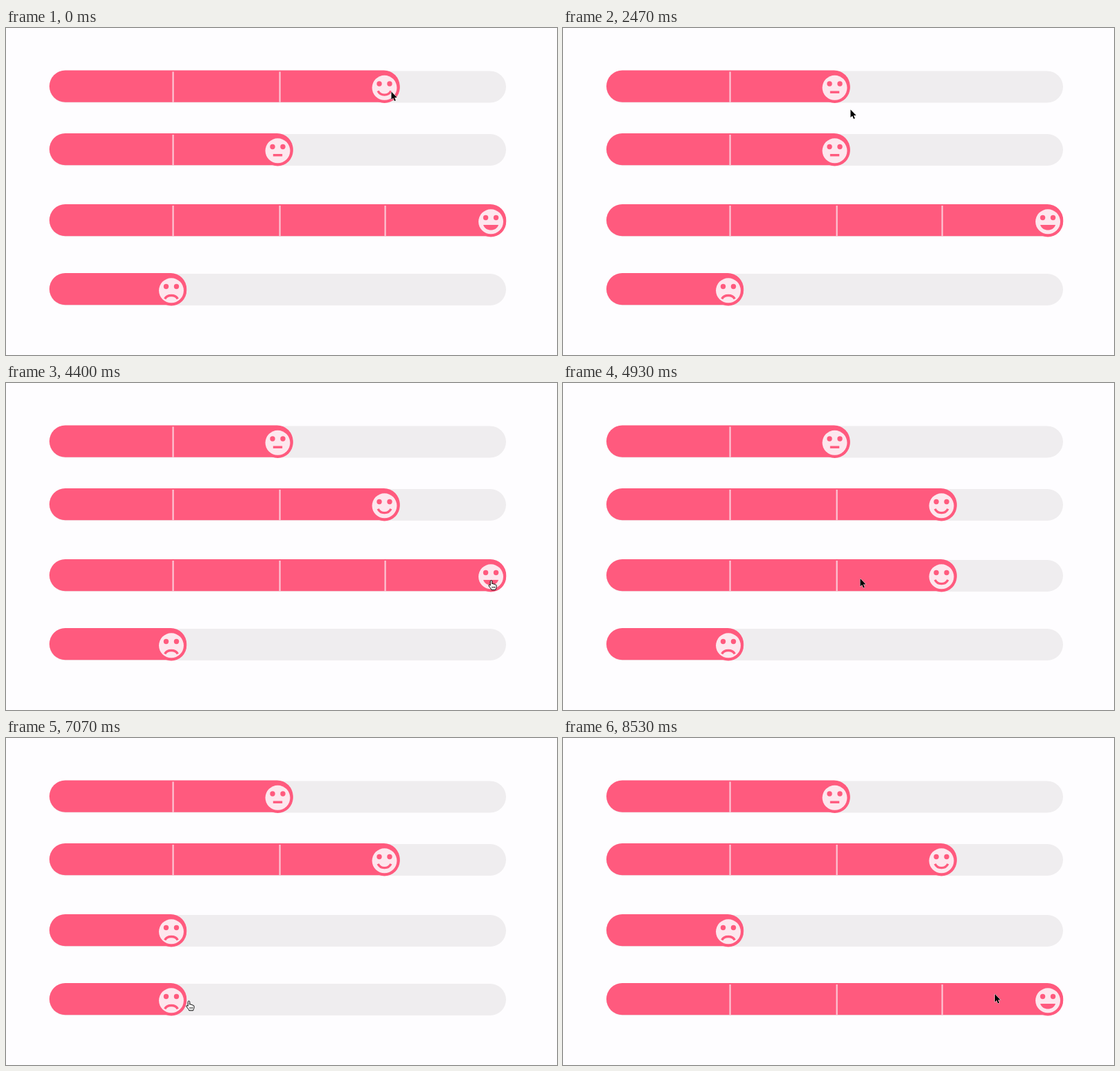
Recreate the animation shown at these times as an HTML page. Size 800 px wide and 475 px high, loop 9270 ms.

```html
<!DOCTYPE html>
<html lang="en">
<head>
<meta charset="utf-8">
<title>Smiley rating sliders</title>
<style>
  html, body { margin: 0; width: 100%; height: 100%; overflow: hidden; background: #fefdff; }
  svg { display: block; width: 100%; height: 100%; }
  .track { fill: #efedef; }
  .fill, .ring, .feature { fill: #ff5a7e; }
  .divider { fill: #fcc6d4; }
  .skin { fill: #fde7ee; }
  .line { fill: none; stroke: #ff5a7e; stroke-width: 3.4; }
  .arrow { fill: #000; stroke: #fff; stroke-width: .9; paint-order: stroke; stroke-linejoin: round; }
  .hand { fill: #fff; stroke: #000; stroke-width: 1; stroke-linejoin: round; }
  .crease { fill: none; stroke: #000; stroke-width: .8; }
</style>
</head>
<body>
<svg viewBox="0 0 800 475">
  <defs>
    <g id="head">
      <circle class="ring" r="22.2"/>
      <circle class="skin" r="18"/>
      <circle class="feature" cx="-7.5" cy="-5.8" r="3.7"/>
      <circle class="feature" cx="7.5" cy="-5.8" r="3.7"/>
    </g>
    <g id="face1"><use href="#head"/><path class="line" d="M-9.3 12.2C-6 5.5 6 5.5 9.3 12.2"/></g>
    <g id="face2"><use href="#head"/><path class="line" d="M-6.7 6.4H6.7"/></g>
    <g id="face3"><use href="#head"/><path class="line" d="M-9.4 4.6C-6 12.2 6 12.2 9.4 4.6"/></g>
    <g id="face4"><use href="#head"/><path class="feature" d="M-11 4.7H11C8.3 14.7-8.3 14.7-11 4.7Z"/></g>
  </defs>
  <g id="rows"></g>
  <path id="arrow" class="arrow" d="M.5 .5V12L3.1 9.6L5 14L6.9 13.2L5 8.9H8.7Z"/>
  <g id="hand">
    <path class="hand" d="M3.2 8.2V2.1C3.2 .2 5.8 .2 5.8 2.1V6C6.3 4.9 8 5.2 8 6.5C8.6 5.6 10.1 6 10.1 7.2C11 6.6 12 7.1 12 8.3V10.5C12 12 11 12.6 10.8 14.5H4.8C4.4 12.5 2.6 11.3 1 8.7C.2 7.2 1.9 6.6 3.2 8.2Z"/>
    <path class="crease" d="M5.9 9.6V12M7.8 9.6V12M9.6 9.6V12"/>
  </g>
</svg>
<script>
const LOOP = 9270;
const TICKS_PER_MS = 0.015;
const FACE_X = [240, 394.5, 549.5, 704];
const DIVIDER_X = [242.5, 397.5, 550.5];

// Each rating step is [tick, rating].
const rows = [
  { top: 61.5, steps: [[0, 3], [29, 2]] },
  { top: 153, steps: [[0, 2], [46, 3]] },
  { top: 256, steps: [[0, 4], [69, 3], [76, 2], [81, 1]] },
  { top: 356, steps: [[0, 1], [108, 2], [110, 3], [120, 4]] }
];

// Pointer stops: tick, x, y.
const stops = [
  [0, 559, 92], [5, 559, 92], [8, 545, 93], [20, 545, 93], [23, 544, 93],
  [24, 544, 93], [29, 466, 94], [34, 378, 92], [36, 378, 92], [37, 417, 118],
  [38, 429, 143], [39, 405, 166], [41, 405, 166], [46, 480, 169], [50, 537, 170],
  [55, 537, 170], [57, 549, 187], [61, 636, 246], [66, 700, 286], [67, 692, 286],
  [69, 622, 285], [74, 431, 283.5], [80, 322, 283], [84, 274.5, 282],
  [92, 274.5, 282], [95, 256, 325], [99, 229, 380], [105, 229, 380],
  [108, 325, 384], [111, 457, 387], [114, 457, 387], [118, 560, 378], [121, 626.5, 371.5]
];
const handSpans = [[8, 25], [34, 36], [39, 42], [50, 56], [65, 67], [98, 106]];

const byId = id => document.getElementById(id);

function add(parent, tag, attrs) {
  const node = document.createElementNS('http://www.w3.org/2000/svg', tag);
  for (const key in attrs) node.setAttribute(key, attrs[key]);
  return parent.appendChild(node);
}

for (const row of rows) {
  const group = add(byId('rows'), 'g', { transform: `translate(0 ${row.top})` });
  add(group, 'rect', { class: 'track', x: 63, y: 1, width: 663, height: 46, rx: 23 });
  row.fill = add(group, 'rect', { class: 'fill', x: 63, y: 0, height: 46.3, rx: 23 });
  row.dividers = DIVIDER_X.map(x =>
    add(group, 'rect', { class: 'divider', x: x - 1, y: 2, width: 2.2, height: 44.3 }));
  row.face = add(group, 'use', { y: 25.3 });
}

function pointerAt(tick) {
  const next = stops.findIndex(stop => stop[0] > tick);
  if (next < 0) return stops[stops.length - 1].slice(1);
  const [t0, x0, y0] = stops[next - 1];
  const [t1, x1, y1] = stops[next];
  const p = (tick - t0) / (t1 - t0);
  return [x0 + (x1 - x0) * p, y0 + (y1 - y0) * p];
}

function setRating(row, rating) {
  if (row.rating === rating) return;
  row.rating = rating;
  const x = FACE_X[rating - 1];
  row.fill.setAttribute('width', x + 22.2 - 63);
  row.dividers.forEach((line, i) => line.setAttribute('visibility', i < rating - 1 ? 'visible' : 'hidden'));
  row.face.setAttribute('x', x);
  row.face.setAttribute('href', '#face' + rating);
}

function draw(ms) {
  const tick = Math.floor((ms % LOOP) * TICKS_PER_MS + 0.06);
  for (const row of rows) {
    setRating(row, row.steps.filter(step => step[0] <= tick).pop()[1]);
  }
  const [x, y] = pointerAt(tick);
  const isHand = handSpans.some(([from, to]) => tick >= from && tick <= to);
  for (const id of ['arrow', 'hand']) {
    byId(id).setAttribute('transform', `translate(${x} ${y})`);
    byId(id).setAttribute('visibility', (id === 'hand') === isHand ? 'visible' : 'hidden');
  }
}

const start = performance.now();
function frame() {
  draw(performance.now() - start);
  requestAnimationFrame(frame);
}
frame();
</script>
</body>
</html>
```
